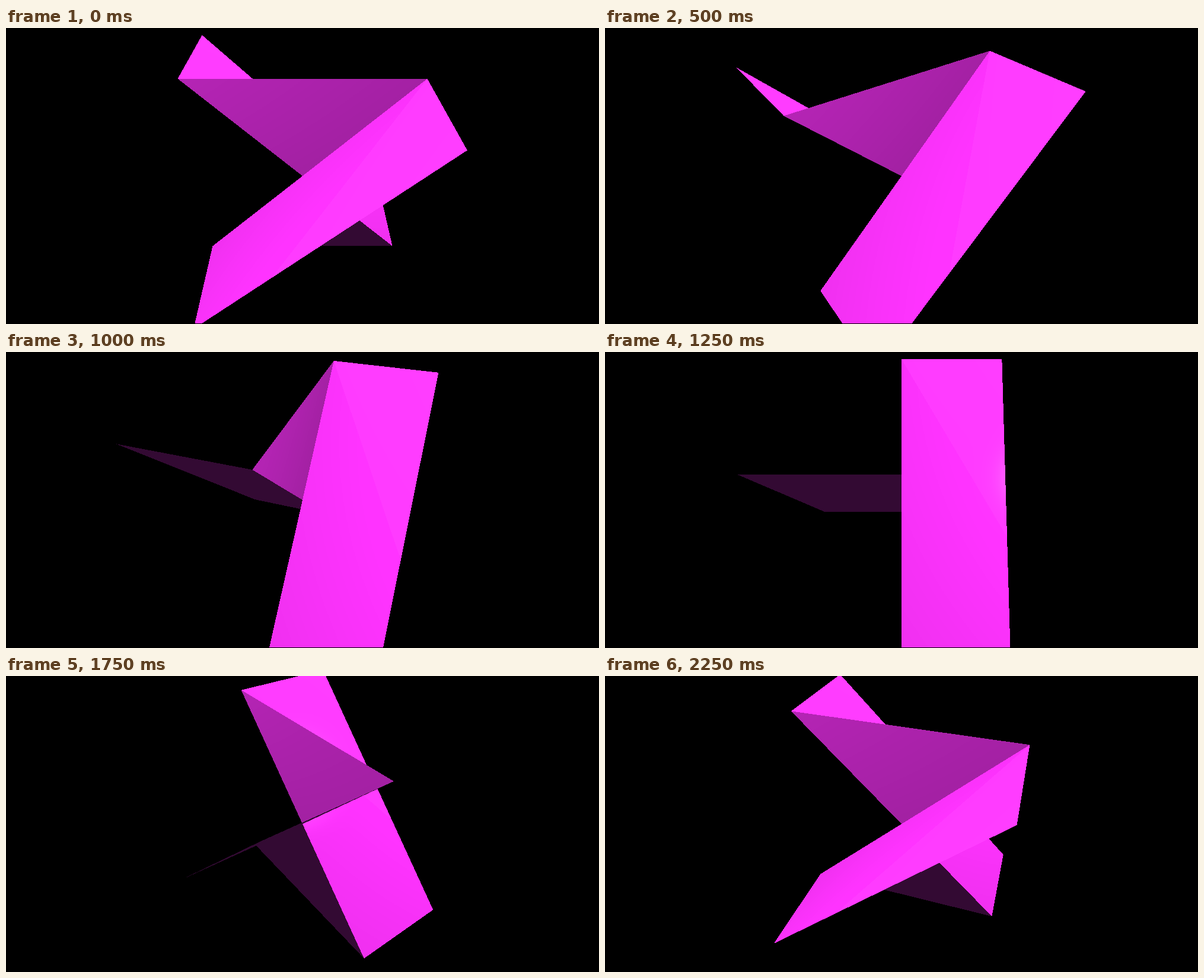
These frames come from a looping animation (1000 by 500 pixels, 2.5 s). An HTML page with a canvas:

```html
<!DOCTYPE html>
<html lang="en">
<head>
<meta charset="utf-8">
<title>Folded ribbon</title>
<style>
  html, body { margin: 0; width: 100%; height: 100%; overflow: hidden; background: #000; }
  canvas { display: block; }
</style>
</head>
<body>
<canvas id="stage" width="1000" height="500"></canvas>
<script>
const WIDTH = 1000, HEIGHT = 500, VISIBLE_ROWS = 499;
const STEP_MS = 250, STEPS = 10;
const FOCAL = 677, CAM_Y = 2.4, CAM_Z = 3;
const COLOR = [255, 51, 255];
const AMBIENT = 0.2, DIFFUSE = 0.9, SHININESS = 200;
const LIGHTS = [[-4, 6, 4], [4, 6, -4]];

// Every face lies in a plane through the center, so a normal and a bound describe it.
const { abs, sqrt, sin, cos, PI } = Math;
const H = Math.SQRT1_2;
const FACES = [
  { n: [H, -H, 0], inside: (x, y, z) => z >= 0 && z <= 1 && abs(y) <= 1 },
  { n: [H, H, 0], inside: (x, y, z) => z <= 0 && z >= -1 && abs(y) <= 1 },
  { n: [0, 0, 1], inside: (x, y, z) => abs(y) <= 1 && abs(x) <= abs(y) }
];

const dot = (a, b) => a[0] * b[0] + a[1] * b[1] + a[2] * b[2];

function hitDistance(face, o, d) {
  const t = -dot(face.n, o) / dot(face.n, d);
  if (!(t > 1e-6)) return Infinity;
  return face.inside(o[0] + d[0] * t, o[1] + d[1] * t, o[2] + d[2] * t) ? t : Infinity;
}

function inShadow(point, toLight, own) {
  return FACES.some(face => face !== own && hitDistance(face, point, toLight) < 1);
}

function shade(face, point, ray) {
  const flip = dot(face.n, ray) > 0 ? -1 : 1;
  const n = face.n.map(v => v * flip);
  const rayLength = sqrt(dot(ray, ray));
  const rayDotN = dot(ray, n);
  let diffuse = AMBIENT, specular = 0;
  for (const light of LIGHTS) {
    const l = light.map((v, i) => v - point[i]);
    const facing = dot(n, l);
    if (facing <= 0 || inShadow(point, l, face)) continue;
    const distance = sqrt(dot(l, l));
    diffuse += DIFFUSE * facing / distance;
    const mirror = (dot(ray, l) - 2 * rayDotN * facing) / (rayLength * distance);
    if (mirror > 0) specular += mirror ** SHININESS;
  }
  return COLOR.map(c => c * diffuse + 255 * specular);
}

// The camera circles the ribbon; rays are cast in the ribbon's own space.
function render(angle) {
  const image = new ImageData(WIDTH, HEIGHT);
  const c = cos(angle), s = sin(angle);
  const camLength = Math.hypot(CAM_Y, CAM_Z);
  const tiltSin = CAM_Y / camLength, tiltCos = CAM_Z / camLength;
  const eye = [-CAM_Z * s, CAM_Y, CAM_Z * c];
  const ray = [0, 0, 0];
  for (let row = 0, at = 0; row < HEIGHT; row++) {
    const v = HEIGHT / 2 - row - 0.5;
    const dy = v * tiltCos - FOCAL * tiltSin;
    const dz = -v * tiltSin - FOCAL * tiltCos;
    for (let col = 0; col < WIDTH; col++, at += 4) {
      image.data[at + 3] = 255;
      if (row >= VISIBLE_ROWS) continue;
      const dx = col + 0.5 - WIDTH / 2;
      ray[0] = dx * c - dz * s;
      ray[1] = dy;
      ray[2] = dx * s + dz * c;
      let nearest = Infinity, hit = null;
      for (const face of FACES) {
        const t = hitDistance(face, eye, ray);
        if (t < nearest) { nearest = t; hit = face; }
      }
      if (!hit) continue;
      const point = eye.map((e, i) => e + ray[i] * nearest);
      image.data.set(shade(hit, point, ray), at);
    }
  }
  return image;
}

const context = document.getElementById("stage").getContext("2d");
const start = performance.now();
const cache = [];
let shown = -1;

function draw(now) {
  const step = Math.floor(Math.max(0, now - start) / STEP_MS) % STEPS;
  if (step !== shown) {
    cache[step] = cache[step] || render(step * PI / STEPS);
    context.putImageData(cache[step], 0, 0);
    shown = step;
  }
  requestAnimationFrame(draw);
}
draw(start);
</script>
</body>
</html>
```
